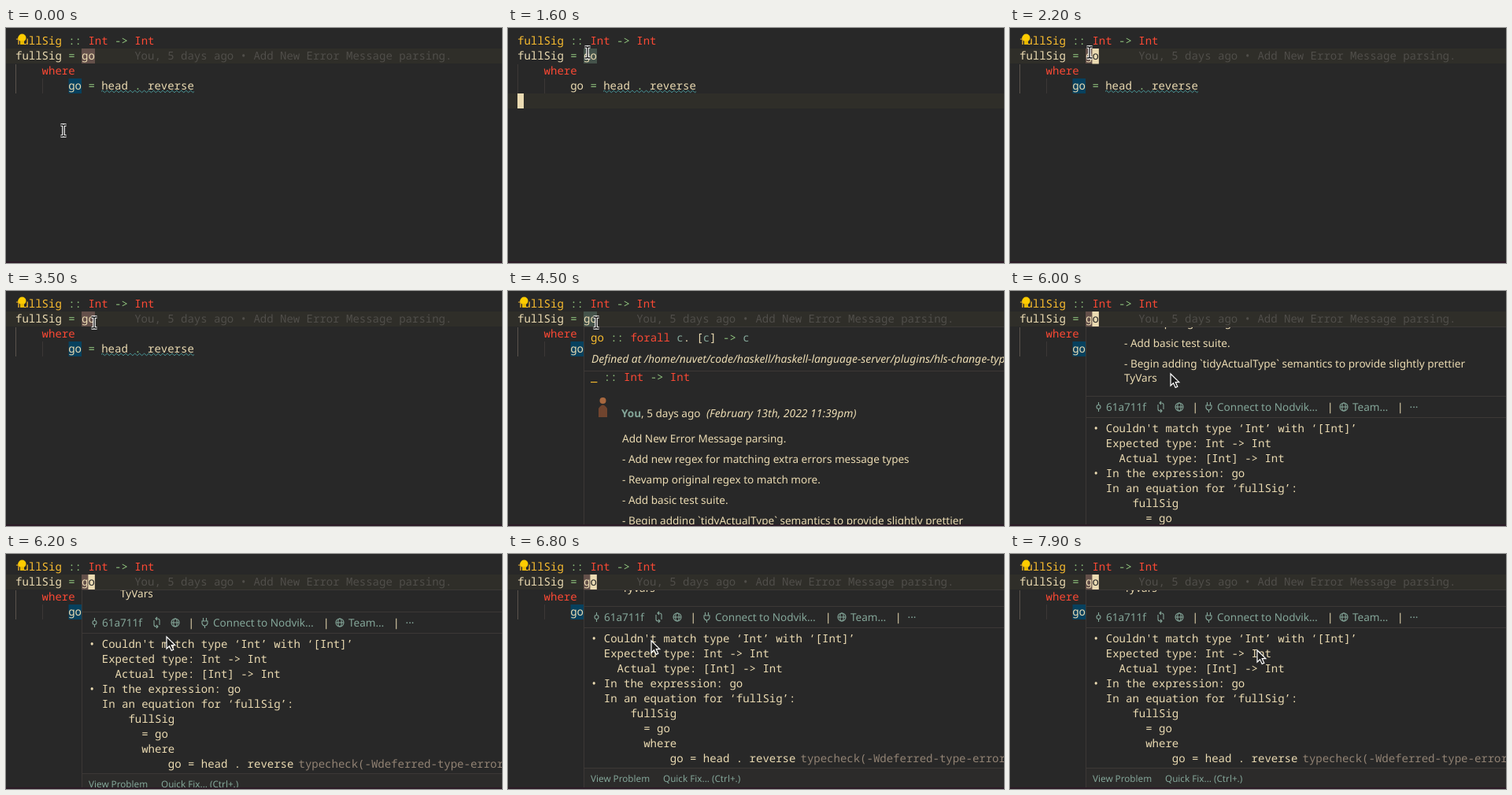
Animation of 630x298 px, one loop 8000 ms. Source, as an HTML page:

```html
<!DOCTYPE html>
<html lang="en">
<head>
<meta charset="utf-8">
<title>Hover in a code editor</title>
<style>
html, body { margin: 0; width: 100%; height: 100%; overflow: hidden; background: #282828 }
svg { display: block }
text { white-space: pre; fill: #ebdbb2; font: 13.55px "Noto Sans", sans-serif; text-rendering: geometricPrecision }
.mono { font: 14px "Noto Sans Mono", monospace }
.small { font-size: 11.7px; fill: #83a598 }
.italic { font-style: italic; font-size: 13.9px }
.y { fill: #fabd2f } .r { fill: #fb4934 } .a { fill: #8ec07c }
.b { fill: #83a598 } .g { fill: #928374 } .d { fill: #282828 }
.n { fill: #504e4a }
.s { fill: #83a598; font-weight: bold }
.line { fill: none; stroke: #3c3836 }
.icon { fill: none; stroke: #83a598; stroke-width: 1.1 }
</style>
</head>
<body>
<svg id="stage" width="630" height="298" viewBox="0 0 630 298"></svg>
<script>
// "{r Int}" inside a string colours that part with class r
const text = (x, y, str, cls = '') => `<text x="${x}" y="${y}" class="${cls}">` +
  str.replace(/\{(\w) (.*?)\}/g, '<tspan class="$1">$2</tspan>') + '</text>';
const mono = (x, y, str) => text(x, y, str, 'mono');
const rect = (x, y, w, h, fill, id = '') =>
  `<rect id="${id}" x="${x}" y="${y}" width="${w}" height="${h}" fill="${fill}"/>`;
const path = (d, cls = 'line') => `<path class="${cls}" d="${d}"/>`;
const group = (id, ...parts) => `<g id="${id}">${parts.join('')}</g>`;
const globe = x => `<g class="icon"><circle cx="${x}" cy="346" r="5"/>` +
  `<ellipse cx="${x}" cy="346" rx="2.2" ry="5"/><path d="M${x - 5} 346h10"/></g>`;

const editor = [
  rect(0, 26, 630, 19, '#2f2e29', 'band'),
  group('marks', rect(96, 26, 17, 19, '#64504a'), rect(79.5, 64, 16.5, 19, '#07415e')),
  rect(96, 26, 17, 19, '#45534b', 'hover'),
  path('M12.5 46V83M46.5 64V83'),
  group('guide', '<path d="M12.5 46V83" stroke="#5a524c"/>'),
  mono(12, 21, '{y fullSig} {a ::} {r Int} {a ->} {r Int}'),
  mono(12, 40, 'fullSig {a =} go'),
  mono(45.6, 59, '{r where}'),
  mono(79.2, 78, 'go {a =} head {a .} reverse'),
  '<path fill="none" stroke="#4a9a9c" d="M121 80.5' + 'q1.475-2.5 2.95 0t2.95 0'.repeat(20) + '"/>',
  group('note', mono(163.2, 40, '{n You, 5 days ago • Add New Error Message parsing.}')),
  group('bulb', '<circle cx="20.5" cy="12.5" r="5" fill="#fc0"/>', rect(18, 16, 5, 5, '#e8b800')),
  group('caret', rect(104.4, 26, 8.4, 19.5, '#ebdbb2'), mono(104.4, 40, '{d o}')),
  rect(12, 83, 8, 19, '#ebdbb2', 'lowCaret')
];

const message = [
  'Add New Error Message parsing.',
  '- Add new regex for matching extra errors message types',
  '- Revamp original regex to match more.',
  '- Add basic test suite.',
  '- Begin adding `tidyActualType` semantics to provide slightly prettier'
].map((s, i) => text(145, 192 + 26 * i, s));

const blame = group('blame',
  group('avatar',
    '<circle cx="120.500" cy="139" r="4" fill="#a8683f"/>',
    '<path d="M115 160V149q5.500-9 11 0v11z" fill="#70442e"/>'),
  group('commit',
    text(144, 160, '{s You}, 5 days ago'),
    text(252, 160, '(February 13th, 2022 11:39pm)', 'italic'),
    ...message,
    text(145, 314, 'TyVars')),
  path('M97 332.5H630'),
  path('M112.5 340v3.5m0 5v3.5M110 346a2.5 2.5 0 1 0 5 0a2.5 2.5 0 1 0-5 0', 'icon'),
  text(122, 351, '61a711f', 'b'),
  path('M188 343v6q0 2 3 2h2m-2-2l2 2-2 2M195 349v-6q0-2-3-2h-2m2-2l-2 2 2 2', 'icon'),
  globe(215),
  text(231.5, 351, '|'),
  path('M249 344h7v3q-1 3-3.5 3t-3.5-3zM250.5 344v-4m4 4v-4M252.5 350v3', 'icon'),
  text(263, 351, 'Connect to Nodvik…', 'b'),
  text(403, 351, '|'),
  globe(424),
  text(435, 351, 'Team…', 'b'),
  text(492, 351, '|'),
  text(507.5, 351, '···', 'b'));

const errors = [
  '• Couldn\'t match type ‘Int’ with ‘[Int]’',
  '  Expected type: Int -> Int',
  '    Actual type: [Int] -> Int',
  '• In the expression: go',
  '  In an equation for ‘fullSig’:',
  '      fullSig',
  '        = go',
  '        where',
  '            go = head . reverse'
].map((s, i) => mono(105, 378 + 19 * i, s));

const popup = group('popup',
  rect(96, 45, 534, 251, '#282828'),
  '<clipPath id="view"><rect x="97" y="46" width="533" height="250"/></clipPath>',
  '<g clip-path="url(#view)">',
  group('content',
    mono(105, 64, '{y go} {a ::} {r forall} {b c}. [{b c}] {a ->} {b c}'),
    text(106, 91, 'Defined at /home/nuvet/code/haskell/haskell-language-server/plugins/hls-change-type-signature', 'italic'),
    path('M97 101.5H630'),
    mono(105, 114, '{y _} {a ::} {r Int} {a ->} {r Int}'),
    blame,
    group('errors',
      path('M97 359.5H630'),
      ...errors,
      mono(371.5, 530, '{g typecheck(-Wdeferred-type-errors)}'),
      rect(97, 537, 533, 26, '#2c2b2a'),
      path('M97 537.5H630'),
      text(105, 555, 'View Problem', 'small'),
      text(197, 555, 'Quick Fix... (Ctrl+.)', 'small'))),
  '</g>',
  path('M96.5 296V45.5H630'));

const beam = 'M-3.5-7h2.5l1 1 1-1h2.5M0-6V6M-3.5 7h2.5l1-1 1 1h2.5';
const mouse = group('mouse',
  group('beam',
    `<path d="${beam}" fill="none" stroke="#fff" stroke-width="3.6"/>`,
    `<path d="${beam}" fill="none" stroke="#111" stroke-width="1.3"/>`),
  group('arrow', '<path d="M0 0V15L3.5 11.7 6.2 17.4 8.8 16.2 6.2 10.6H10.8Z" fill="#1c1c1c" stroke="#fff" stroke-width="1.2"/>'));

document.getElementById('stage').innerHTML =
  editor.join('') + popup + rect(0, 296, 630, 2, '#2c1b26') + mouse;

const easeOut = p => 1 - (1 - p) ** 2;
const ease = (t, start, end) => easeOut(Math.min(1, Math.max(0, (t - start) / (end - start))));

// Pointer glides after its starting place (73, 130)
const glides = [
  { start: 1000, end: 1400, to: [101, 31] },
  { start: 3000, end: 3500, to: [112, 40] },
  { start: 4500, end: 5000, to: [224, 111] },
  { start: 5100, end: 5500, to: [204, 105] },
  { start: 6700, end: 6800, to: [182, 110] },
  { start: 6800, end: 7300, to: [315, 114] },
  { start: 7700, end: 7900, to: [314, 122] }
];
const pointer = t => glides.reduce((pos, { start, end, to }) =>
  pos.map((v, i) => v + (to[i] - v) * ease(t, start, end)), [73, 130]);

const el = id => document.getElementById(id);
const show = (id, on) => el(id).style.display = on ? '' : 'none';
const shift = (id, x, y) => el(id).setAttribute('transform', `translate(${Math.round(x)} ${Math.round(y)})`);
const within = (t, start, end) => t >= start && t < end;

function draw() {
  const t = Math.floor(performance.now() % 8000 / 100) * 100;
  const low = within(t, 600, 1800);
  const early = t < 3800;
  const blinkStart = low ? 600 : 1900;
  const caretOn = t >= 600 && Math.floor((t - blinkStart) / 490) % 2 === 0;

  el('band').setAttribute('y', low ? 83 : 26);
  show('guide', !low);
  show('marks', !within(t, 600, 2200));
  show('note', !within(t, 600, 2100));
  show('bulb', !within(t, 800, 2100));
  show('hover', within(t, 1600, 1800) || within(t, 3800, 4800));
  show('caret', caretOn && !low);
  show('lowCaret', caretOn && low);

  show('popup', !early || within(t, 1700, 1800));
  show('blame', !early);
  shift('errors', 0, early ? -241 : 0);
  show('avatar', t >= 4200);
  shift('commit', 0, t < 4200 ? -8 : 0);
  shift('content', 0, -266 * ease(t, 5700, 6300));

  shift('mouse', ...pointer(t));
  show('beam', t < 4600);
  show('arrow', t >= 4600);
  requestAnimationFrame(draw);
}
draw();
</script>
</body>
</html>
```
